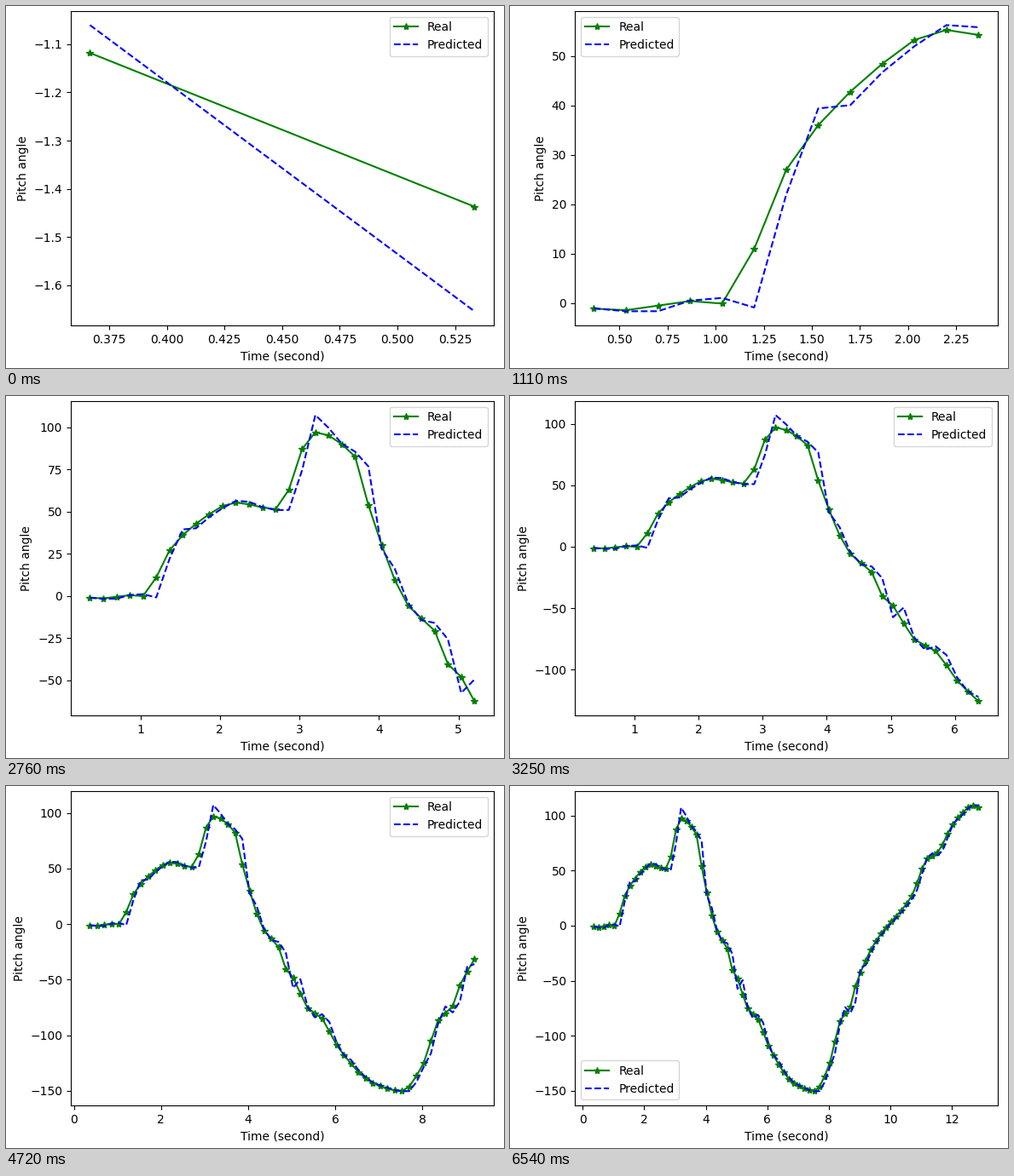
A matplotlib script for the animation above (6.57 s loop, 584 by 425 pixels).

```python
import numpy as np
import matplotlib.pyplot as plt
from matplotlib.animation import FuncAnimation

W, H, DPI = 584, 425, 100
LOOP, STEP = 6570, 30  # ms
COUNT = 76

# Turning points of the pitch curve: (reading, degrees)
TURNS = [(0, -1.118), (1, -1.437), (3, 0.42), (4, -0.1), (6, 27), (8, 42.8),
         (11, 55.3), (14, 51.4), (15, 62.9), (16, 87), (17, 97), (20, 82.5),
         (21, 53.8), (24, -5.8), (26, -20.7), (27, -40.4), (28, -48),
         (30, -75.5), (32, -85), (34, -109), (39, -143), (43, -150.2),
         (46, -125), (48, -86.5), (50, -73.8), (51, -55), (55, -14),
         (62, 27), (65, 60.8), (67, 66.3), (70, 92), (74, 108.7), (75, 107.3)]
LEAD_IN = [-4.28, -1.335, -0.75]  # unseen readings before the first one

# Pace of arrival: (reading, ms)
PACE = [(0, 0), (1, 150), (7, 740), (23, 2190), (26, 2590), (35, 3250),
        (58, 5230), (66, 5940), (74, 6540)]


def smooth(points, x):
    """Cubic Hermite curve that never overshoots its points."""
    px, py = np.array(points, float).T
    h = np.diff(px)
    d = np.diff(py) / h
    a, b = d[:-1], d[1:]
    slope = np.zeros_like(py)
    same = a * b > 0
    slope[1:-1][same] = 2 * a[same] * b[same] / (a + b)[same]
    i = np.clip(np.searchsorted(px, x, side="right") - 1, 0, len(h) - 1)
    t = (x - px[i]) / h[i]
    ease = t * t * (3 - 2 * t)
    bend = t * (1 - t) * ((1 - t) * slope[i] - t * slope[i + 1])
    return py[i] + (py[i + 1] - py[i]) * ease + h[i] * bend


def predict(history):
    """Next value from the last three: damped linear extrapolation."""
    d = np.diff(history)
    return history[2:-1] + 0.98 * d[1:-1] - 0.3 * d[:-2]


index = np.arange(COUNT)
time = 0.3667 + index / 6
real = smooth(TURNS, index)
predicted = predict(np.concatenate([LEAD_IN, real]))
arrivals = np.interp(index[:-1], *zip(*PACE))

fig = plt.figure(figsize=(W / DPI, H / DPI), dpi=DPI)
ax = fig.add_axes([75.9 / W, 49.8 / H, 496 / W, 369.6 / H])
ax.set_xlabel("Time (second)")
ax.set_ylabel("Pitch angle")
real_line, = ax.plot(time[:2], real[:2], "g*-", label="Real")
pred_line, = ax.plot(time[:2], predicted[:2], "b--", label="Predicted")
ax.legend(loc="best")


def update(i):
    now = i * STEP + 20
    n = np.searchsorted(arrivals, now, side="right") + 1
    real_line.set_data(time[:n], real[:n])
    pred_line.set_data(time[:n], predicted[:n])
    ax.relim()
    ax.autoscale_view()
    return real_line, pred_line


anim = FuncAnimation(fig, update, frames=LOOP // STEP, interval=STEP,
                     repeat=True, cache_frame_data=False)
plt.show()
```
